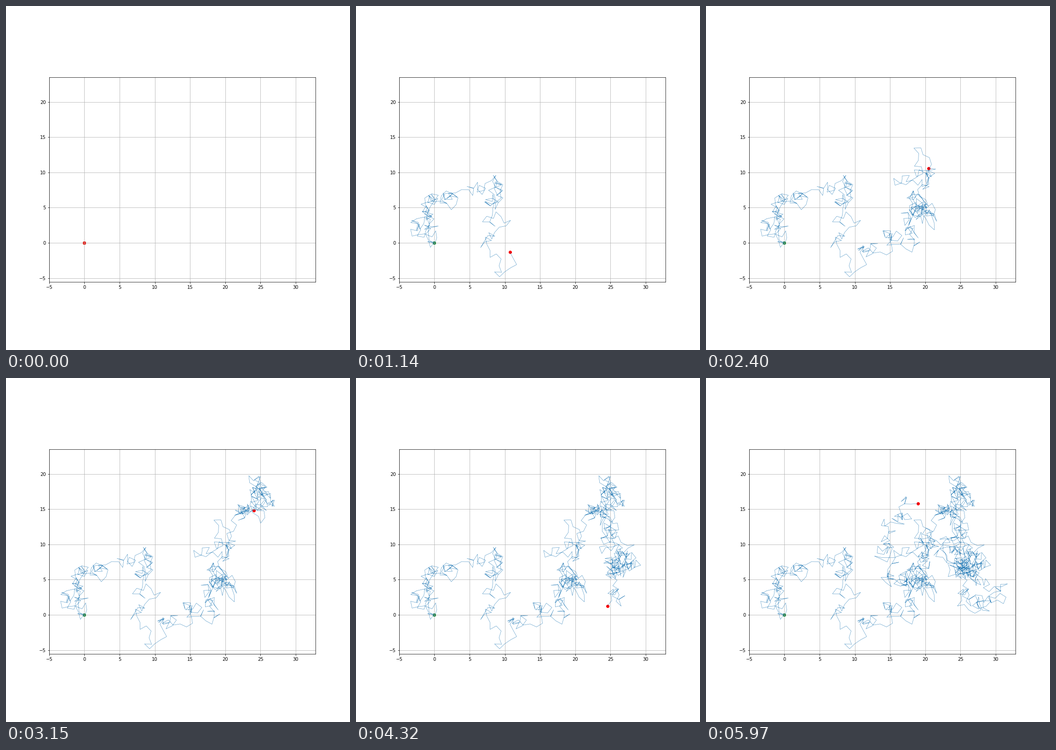
Animation, 748 px wide and 748 px high, one loop 6000 ms. Source, as a matplotlib script:

```python
import numpy as np
import matplotlib.pyplot as plt
from matplotlib.animation import FuncAnimation

FRAMES, INTERVAL, STRIDE = 200, 30, 5
STEPS = (FRAMES - 1) * STRIDE
CHUNKS = 3  # bridges between neighbouring places

# Rough course of the walk, passed at an even pace.
COURSE = np.array([
    (0, 0), (-2.2, 1.2), (0, 6), (1.5, 7), (9, 8.8), (8.2, 5.8), (8.8, -1.8),
    (15.2, -.2), (17.8, 1.2), (18, 4.7), (20.2, 3.8), (20.2, 5), (18.2, 9),
    (20.5, 10.3), (22.5, 15), (24.5, 14.8), (25, 19.7), (25.5, 16.8),
    (23.8, 12.8), (25, 10.3), (25.3, 6.3), (28.5, 6.8), (26.5, 8.8),
    (24.5, 6), (27.1, .1), (29, 2.7), (26.5, 6.5), (24.5, 7), (23.5, 9.8),
    (20.5, 11), (17.4, 4.2), (14.5, 5.5), (14.8, 12), (19, 15.8),
])

rng = np.random.default_rng(7)


def bridge(shift, count):
    """Random unit steps that add up to the given shift."""
    steps = np.exp(2j * np.pi * rng.random(count))
    for _ in range(150):
        steps += (shift - steps.sum()) / count
        steps /= np.abs(steps)
    return steps + (shift - steps.sum()) / count


def build_walk():
    legs = len(COURSE) - 1
    marks = np.linspace(0, STEPS, legs * CHUNKS + 1).astype(int)
    pace = np.linspace(0, STEPS, legs + 1)
    gx, gy = (np.interp(marks, pace, c) for c in COURSE.T)
    shifts = np.diff(gx + 1j * gy)
    steps = [bridge(s, n) for s, n in zip(shifts, np.diff(marks))]
    walk = np.cumsum(np.concatenate([[0], *steps]))
    return walk.real, walk.imag


x, y = build_walk()

fig, ax = plt.subplots(figsize=(10.389, 10.389), dpi=72)
ax.set_aspect("equal")
ax.set_xlim(-5.02, 32.82)
ax.set_ylim(-5.55, 23.48)
ax.grid()
ax.scatter(0, 0, color="green")
head = ax.scatter(0, 0, color="red")
trail, = ax.plot([], [], lw=0.5, color="tab:blue")


def update(i):
    n = i * STRIDE
    trail.set_data(x[:n + 1], y[:n + 1])
    head.set_offsets([(x[n], y[n])])
    return trail, head


anim = FuncAnimation(fig, update, frames=FRAMES, interval=INTERVAL,
                     repeat=True, repeat_delay=0)
plt.show()
```
